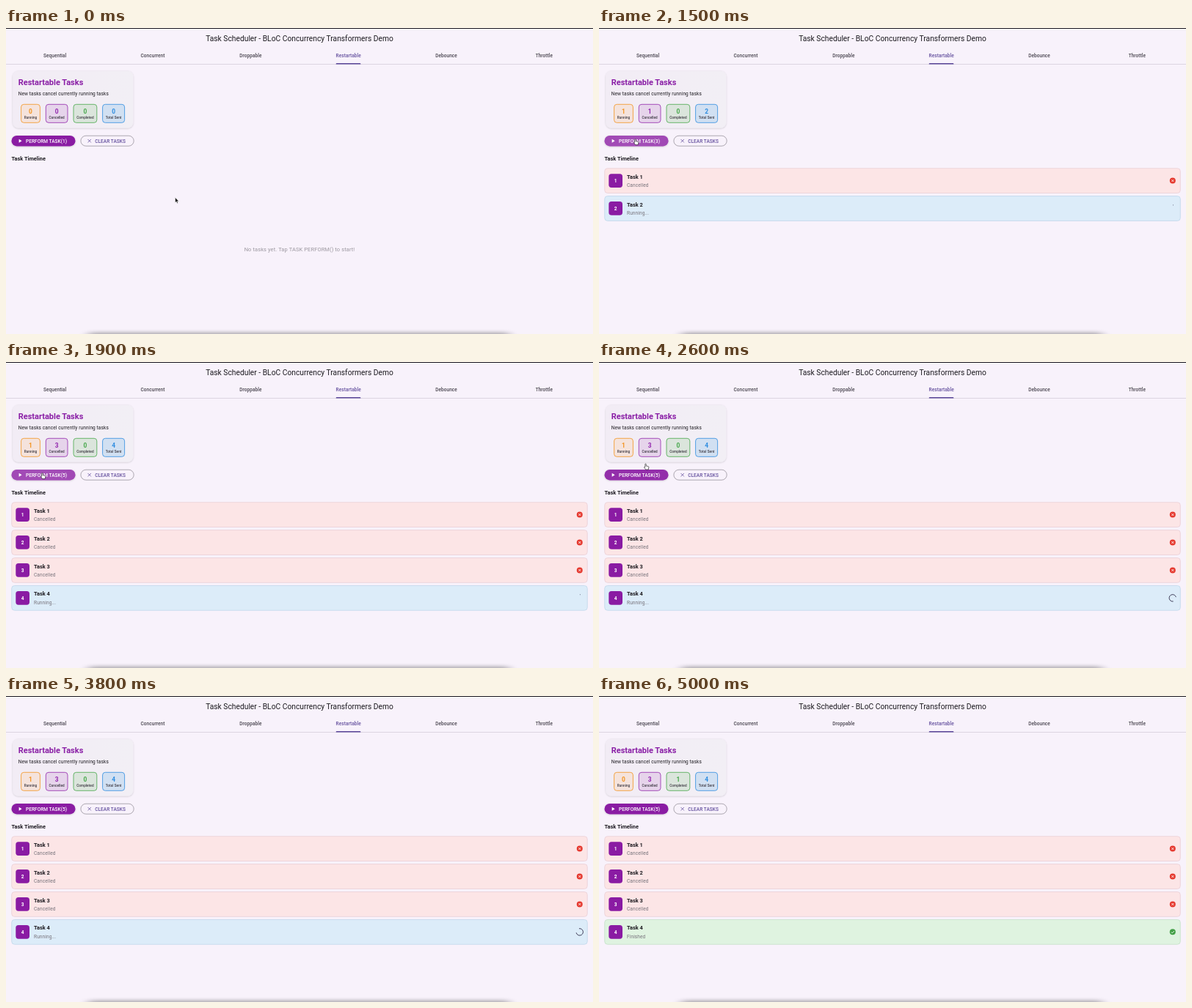
Write an HTML page that moves like this. It is 800 px wide and 418 px high and loops after 5.1 s.

```html
<!DOCTYPE html>
<html lang="en">
<head>
<meta charset="utf-8">
<title>Task Scheduler</title>
<style>
  html, body { margin: 0; width: 100%; height: 100%; overflow: hidden; background: #f8f2fb; }
  svg { display: block; width: 100vw; height: 100vh; }
  text { font-family: Roboto, sans-serif; fill: #1d1b20; white-space: pre; }
  .mid { text-anchor: middle; }
  .title { font-size: 10.28px; }
  .tab { font-size: 6.53px; font-weight: 500; letter-spacing: .047px; fill: #49454f; }
  .tab.on { fill: #65519f; }
  .head { font-size: 11px; font-weight: 700; fill: #8a1fa6; }
  .body { font-size: 6.53px; letter-spacing: .117px; }
  .grey { fill: #77737b; }
  .num { font-size: 8.4px; font-weight: 700; }
  .label { font-size: 4.67px; font-weight: 500; letter-spacing: .08px; fill: #3c3842; }
  .btn { font-size: 6.53px; font-weight: 500; letter-spacing: .047px; }
  .bold { font-size: 7.4px; font-weight: 700; }
  .empty { font-size: 7.47px; letter-spacing: .117px; fill: #9b979f; }
  .badge { font-size: 6.53px; font-weight: 700; fill: #fff; }
</style>
</head>
<body>
<svg id="stage" viewBox="0 0 800 418" preserveAspectRatio="none"></svg>
<script>
const LOOP = 5100, STEP = 100;
const STARTS = [1300, 1500, 1700, 1900], DONE = 4200;
const HOVER = [900, 2700], PRESS = [1200, 2200];

const text = (x, y, cls, s, attrs = '') => `<text x="${x}" y="${y}" class="${cls}" ${attrs}>${s}</text>`;
const rect = (x, y, w, h, r, attrs) => `<rect x="${x}" y="${y}" width="${w}" height="${h}" rx="${r}" ${attrs}/>`;
const path = (d, attrs) => `<path d="${d}" ${attrs}/>`;

const tabs = ['Sequential', 'Concurrent', 'Droppable', 'Restartable', 'Debounce', 'Throttle']
  .map((s, i) => text(66.7 + i * 133.33, 40.3, 'tab mid' + (i === 3 ? ' on' : ''), s)).join('');

const stats = [
  ['running', 'Running', 20.6, 25.8, '#f3931f', '#f5e3dc'],
  ['cancelled', 'Cancelled', 54.3, 29.7, '#9226ad', '#e6d4eb'],
  ['completed', 'Completed', 92, 31.8, '#47a84b', '#dbe5dc'],
  ['sent', 'Total Sent', 131.6, 30, '#2f8de0', '#d1e0f2'],
].map(([id, label, x, w, ink, fill]) =>
  rect(x, 104.3, w, 25, 3.7, `fill="${fill}" stroke="${ink}" stroke-width=".8"`) +
  text(x + w / 2, 116.7, 'num mid', '0', `id="${id}" style="fill:${ink}"`) +
  text(x + w / 2, 124, 'label mid', label)).join('');

const rows = STARTS.map((_, i) => `
  <g class="row" transform="translate(0 ${i * 37.92})">
    ${rect(7.7, 191.7, 784.6, 33.8, 4, 'class="box" stroke-width=".7"')}
    ${rect(13.3, 199.2, 18.7, 18.7, 3.7, 'fill="#8a1ba3"')}
    ${text(22.7, 210.9, 'badge mid', i + 1)}
    ${text(38, 205.7, 'bold', 'Task ' + (i + 1))}
    ${text(38, 217.3, 'body grey state', '')}
    <g transform="translate(781.8 208.6)">
      <g class="bad"><circle r="4" fill="#e5392f"/>
        ${path('M-1.5-1.5 1.5 1.5M1.5-1.5-1.5 1.5', 'stroke="#fff" stroke-width=".85"')}</g>
      <g class="good"><circle r="4" fill="#43a047"/>
        ${path('M-2 .1-.6 1.5 2.1-1.3', 'fill="none" stroke="#fff" stroke-width=".85"')}</g>
      ${path('', 'class="spin" fill="none" stroke="#35324f" stroke-width=".95"')}
    </g>
  </g>`).join('');

const stage = document.getElementById('stage');
stage.innerHTML = `
  <defs>
    <filter id="soft" x="-10%" y="-10%" width="120%" height="130%">
      <feDropShadow dx="0" dy=".6" stdDeviation=".8" flood-color="#000" flood-opacity=".2"/></filter>
    <filter id="blur" x="-10%" y="-200%" width="120%" height="500%"><feGaussianBlur stdDeviation="7 2.5"/></filter>
    <linearGradient id="card"><stop stop-color="#f2ecf5"/><stop offset="1" stop-color="#f2eff5"/></linearGradient>
    <radialGradient id="glow"><stop stop-color="#fff" stop-opacity=".16"/>
      <stop offset=".7" stop-color="#fff" stop-opacity=".12"/><stop offset="1" stop-color="#fff" stop-opacity="0"/></radialGradient>
    <clipPath id="pill">${rect(7.5, 147, 87, 14.4, 7.2, '')}</clipPath>
  </defs>
  ${rect(0, 0, 800, 418, 0, 'fill="#f8f2fb"')}
  ${rect(0, 0, 800, 1, 0, 'fill="#17151b"')}
  ${rect(112, 416, 574, 8, 4, 'fill="#000" opacity=".32" filter="url(#blur)"')}
  ${text(400, 17.6, 'title mid', 'Task Scheduler - BLoC Concurrency Transformers Demo')}
  ${tabs}
  ${rect(0, 49, 800, .6, 0, 'fill="#cac4d0"')}
  ${path('M449.7 49.4V48.9Q449.7 47.9 450.7 47.9H482.4Q483.4 47.9 483.4 48.9V49.4Z', 'fill="#5b4799"')}
  ${rect(9.3, 59, 164, 77.5, 7.5, 'fill="url(#card)" filter="url(#soft)"')}
  ${text(16.7, 78, 'head', 'Restartable Tasks')}
  ${text(16.7, 92.3, 'body', 'New tasks cancel currently running tasks')}
  ${stats}
  ${rect(7.5, 147, 87, 14.4, 7.2, 'fill="#8a1ba3" filter="url(#soft)"')}
  <g clip-path="url(#pill)">
    ${rect(7.5, 147, 87, 14.4, 0, 'id="hover" fill="#fff"')}
    <circle id="ripple" cx="50" cy="155" fill="url(#glow)"/>
  </g>
  ${path('M17.6 151.7V156.7L21.6 154.2Z', 'fill="#fff"')}
  ${text(27, 156.5, 'btn', '', 'id="perform" style="fill:#fff"')}
  ${rect(101.9, 147.2, 72.3, 14, 7, 'fill="none" stroke="#79747e" stroke-width=".6"')}
  ${path('M111.5 152 115.9 156.4M115.9 152 111.5 156.4', 'stroke="#65519f" stroke-width=".8"')}
  ${text(121.2, 156.5, 'btn', 'CLEAR TASKS', 'style="fill:#65519f"')}
  ${text(7.6, 180.7, 'bold', 'Task Timeline')}
  ${text(400, 305.1, 'empty mid', 'No tasks yet. Tap TASK PERFORM() to start!', 'id="empty"')}
  ${rows}
  <g id="cursor" stroke-linejoin="round">
    ${path('M0 0V6.9L1.6 5.5 2.6 7.8 3.8 7.3 2.8 5.1H4.9Z', 'id="arrow" stroke="#fff" stroke-width=".5" fill="#111"')}
    ${path('M-1.2-3Q-.5-3.8.1-3V-.4L2.9.1Q3.9.4 3.8 1.4L3.2 4.6H-.3L-2.6 1.5Q-2.4.4-1.2 1.2Z',
      'id="hand" stroke="#111" stroke-width=".6" fill="#fff"')}
  </g>`;

const $ = id => document.getElementById(id);
const rowEls = [...stage.querySelectorAll('.row')].map(g => {
  const pick = c => g.querySelector('.' + c);
  return { g, box: pick('box'), state: pick('state'), bad: pick('bad'), good: pick('good'), spin: pick('spin') };
});
const show = (el, on) => el.setAttribute('visibility', on ? 'inherit' : 'hidden');
const put = (id, s) => { $(id).textContent = s; };
const clamp = v => Math.min(1, Math.max(0, v));
const smooth = v => { v = clamp(v); return v * v * (3 - 2 * v); };
const within = (t, [a, b]) => t >= a && t < b;

// cubic-bezier(.4, 0, .2, 1)
function fastOutSlowIn(x) {
  x = clamp(x);
  let lo = 0, hi = 1;
  for (let i = 0; i < 20; i++) {
    const m = (lo + hi) / 2, n = 1 - m;
    if (1.2 * n * n * m + .6 * n * m * m + m * m * m < x) lo = m; else hi = m;
  }
  return 3 * (1 - lo) * lo * lo + lo ** 3;
}

// Material indeterminate progress arc
function spinner(ms) {
  const p = ms / 1333 % 1, turn = Math.PI * 2;
  const head = fastOutSlowIn(p * 2) * .75, tail = fastOutSlowIn(p * 2 - 1) * .75;
  const a = turn * (tail + ms / 2222 + p * .25 - .25);
  const sweep = Math.max(turn * (head - tail), .16), b = a + sweep, r = 4.7;
  const at = v => `${(r * Math.cos(v)).toFixed(2)} ${(r * Math.sin(v)).toFixed(2)}`;
  return `M${at(a)}A${r} ${r} 0 ${sweep > Math.PI ? 1 : 0} 1 ${at(b)}`;
}

const LOOKS = {
  Cancelled: ['#fce5e6', '#e9ccd3'],
  'Running...': ['#dcecf9', '#bcd5e8'],
  Finished: ['#dff3e0', '#c0dfc4'],
};

function drawCursor(t) {
  let x = 230.6, y = 231.6;
  if (t >= 100) { x -= 1; y -= .5; }
  const go = smooth((t - 300) / 600), leave = smooth((t - 2500) / 600);
  x += (50 - x) * go + 190 * leave;
  y += (155 - y) * go - 170 * leave;
  const over = within(t, HOVER);
  $('cursor').setAttribute('transform', `translate(${x} ${y})`);
  show($('cursor'), t < 3100);
  show($('arrow'), !over);
  show($('hand'), over);
  $('hover').setAttribute('opacity', over ? .08 : 0);
  $('ripple').setAttribute('r', within(t, PRESS) ? 22 + 48 * clamp((t - PRESS[0]) / 300) : 0);
}

function draw(t) {
  const sent = STARTS.filter(s => t >= s).length, done = t >= DONE;
  put('running', sent && !done ? 1 : 0);
  put('cancelled', Math.max(0, sent - 1));
  put('completed', done ? 1 : 0);
  put('sent', sent);
  put('perform', `PERFORM TASK(${sent + 1})`);
  show($('empty'), !sent);
  rowEls.forEach((row, i) => {
    const state = i < sent - 1 ? 'Cancelled' : done ? 'Finished' : 'Running...';
    const [fill, edge] = LOOKS[state];
    row.g.style.display = i < sent ? '' : 'none';
    row.box.setAttribute('fill', fill);
    row.box.setAttribute('stroke', edge);
    row.state.textContent = state;
    show(row.bad, state === 'Cancelled');
    show(row.good, state === 'Finished');
    show(row.spin, state === 'Running...');
    if (i < sent) row.spin.setAttribute('d', spinner(t - STARTS[i] + 20));
  });
  drawCursor(t);
}

const began = performance.now();
function tick() {
  const t = (performance.now() - began) % LOOP;
  draw(Math.floor(t / STEP) * STEP);
  requestAnimationFrame(tick);
}
tick();
</script>
</body>
</html>
```
